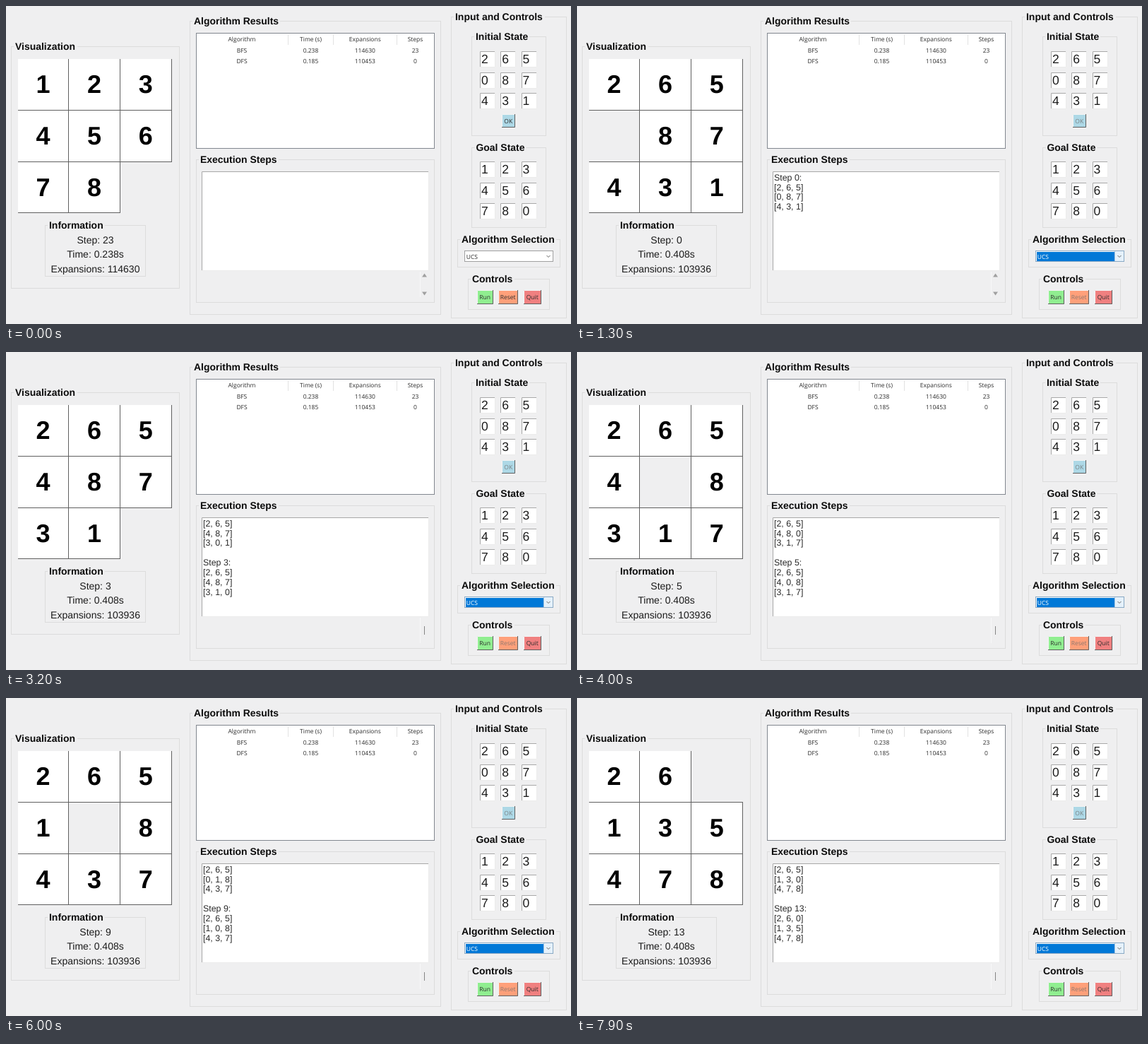
An HTML page for the animation above (8 s loop, 800 by 450 pixels).

```html
<!DOCTYPE html>
<html>
<head>
<meta charset="utf-8">
<style>
html, body { margin: 0; width: 100%; height: 100%; overflow: hidden; background: #efeff0; }
svg { display: block; width: 800px; height: 450px; }
text {
  font: 14px "Liberation Sans", Arial, sans-serif; fill: #1c1c1c;
  white-space: pre; text-rendering: geometricPrecision;
}
.title { font-size: 13.95px; font-weight: bold; fill: #0c0c0c; }
.tile { font-size: 36px; font-weight: bold; fill: #000; }
.log { font-size: 12.4px; fill: #2a2a2a; }
.entry { font-size: 17.5px; }
.ui { font: 8.5px "Open Sans", "Noto Sans", sans-serif; fill: #2c2c2c; }
.mid { text-anchor: middle; }
</style>
</head>
<body>
<svg id="stage" viewBox="0 0 800 450"></svg>
<script>
const LOOP = 8000, START = 1220, STEP = 507, SELECT_AT = 200;
const INITIAL = [2, 6, 5, 0, 8, 7, 4, 3, 1];
const GOAL = [1, 2, 3, 4, 5, 6, 7, 8, 0];
const BLANKS = [3, 6, 7, 8, 5, 4, 7, 6, 3, 4, 7, 8, 5, 2];

// Each state swaps the blank with the tile at its next position.
const states = [INITIAL];
for (let i = 1; i < BLANKS.length; i++) {
  const s = [...states[i - 1]];
  s[BLANKS[i - 1]] = s[BLANKS[i]];
  s[BLANKS[i]] = 0;
  states.push(s);
}

const text = (x, y, s, cls = '', extra = '') =>
  `<text x="${x}" y="${y}" class="${cls}" ${extra}>${s}</text>`;
const rect = (x, y, w, h, fill, stroke = 'none') =>
  `<rect x="${x}" y="${y}" width="${w}" height="${h}" fill="${fill}" stroke="${stroke}"/>`;
const path = (d, stroke, fill = 'none') => `<path d="${d}" stroke="${stroke}" fill="${fill}"/>`;

function group(x, y, r, b, title, tx, tw) {
  return rect(x + .5, y + .5, r - x - 1, b - y - 1, 'none', '#dcdcdc') +
    rect(tx - 2, y - 4, tw + 4, 9, '#efeff0') + text(tx, y + 5.4, title, 'title');
}

function bevel(x, y, w, h, fill, topLeft, bottomRight) {
  return rect(x, y, w, h, fill) +
    path(`M${x + .5} ${y + h}V${y + .5}H${x + w}`, topLeft) +
    path(`M${x + w - .5} ${y}V${y + h - .5}H${x}`, bottomRight);
}

const sunken = (x, y, w, h) => bevel(x, y, w, h, '#fff', '#a8a8a8', '#ebebeb');

function button(x, y, w, h, fill, label, off) {
  return bevel(x, y, w, h, fill, '#f4f4f4', '#606060') +
    text(x + w / 2 - .3, y + h / 2 + 3, label, 'ui mid', off ? 'style="fill:#6d6d6d;opacity:.8"' : '');
}

const entries = (state, y) => state.map((n, i) => {
  const ex = 671 + i % 3 * 29.3, ey = y + Math.floor(i / 3) * 29.5;
  return sunken(Math.round(ex), Math.round(ey), 22, 23) + text(ex + 2, ey + 17.2, n, 'entry');
}).join('');

const row = (y, cells) =>
  cells.map((c, i) => text([334, 431.5, 508.3, 579.5][i], y, c, 'ui mid')).join('');

const fixed =
  group(7, 57, 246, 400, 'Visualization', 13, 86) +
  group(55, 310, 198, 383, 'Information', 61, 77) +
  group(260, 21, 616, 437, 'Algorithm Results', 266, 120) +
  rect(269.5, 38.5, 337, 163, '#fff', '#82878f') +
  [399.5, 463.5, 553.5].map(x => path(`M${x} 40V55`, '#e2e2e2')).join('') +
  row(50.2, ['Algorithm', 'Time (s)', 'Expansions', 'Steps']) +
  row(66, ['BFS', '0.238', '114630', '23']) +
  row(80.5, ['DFS', '0.185', '110453', '0']) +
  group(269, 217, 607, 420, 'Execution Steps', 275, 109) +
  sunken(277, 234, 322, 141) +
  path('M586.5 376V412', '#f8f8f8') +
  group(630, 15, 794, 442, 'Input and Controls', 636, 125) +
  group(659, 43, 765, 184, 'Initial State', 665, 74) + entries(INITIAL, 64) +
  group(659, 200, 765, 314, 'Goal State', 665.5, 69) + entries(GOAL, 220) +
  group(639, 330, 785, 370, 'Algorithm Selection', 645, 132) +
  group(654, 386, 770, 430, 'Controls', 660, 58) +
  button(667, 402, 23, 20, '#90ee90', 'Run') +
  button(733, 402, 25, 20, '#f08080', 'Quit');

// Tile edges snap to whole pixels so that the grid lines stay crisp.
const edge = (start, i) => Math.floor(start + 72.6 * i) + .5;

function board(state) {
  const tiles = state.map((n, i) => {
    if (!n) return '';
    const c = i % 3, r = Math.floor(i / 3);
    const x = edge(16.3, c), y = edge(74.8, r);
    return rect(x, y, edge(16.3, c + 1) - x, edge(74.8, r + 1) - y, '#fff', '#606060') +
      text(52.5 + c * 72.6, 123.3 + r * 72.6, n, 'tile mid');
  }).join('');
  return `<clipPath id="area"><path d="M17 75H236V294H17Z"/></clipPath><g clip-path="url(#area)">${tiles}</g>`;
}

function log(step) {
  const lines = [];
  for (let i = 0; i <= step; i++) {
    lines.push(`Step ${i}:`);
    for (let r = 0; r < 9; r += 3) lines.push(`[${states[i].slice(r, r + 3).join(', ')}]`);
    lines.push('');
  }
  lines.push('');
  return lines.slice(-10).map((s, i) => text(279, 246.7 + i * 13.86, s, 'log')).join('');
}

function scrollbar(active) {
  return active ? path('M592.5 388V400', '#858585')
    : path('M589 383.5L592.5 378.5L596 383.5Z', 'none', '#a0a0a0') +
      path('M589 404.5L592.5 409.5L596 404.5Z', 'none', '#a0a0a0');
}

function combo(selected) {
  return rect(649.5, 346.5, 125, 15, '#fff', selected ? '#8aa9c4' : '#a0a0a0') +
    (selected ? rect(651, 348, 110, 13, '#0078d7') + rect(762, 347, 12, 14, '#e5f1fb') +
      path('M761.5 347V361', '#a9c9e2') : '') +
    text(651.7, 357.5, 'UCS', 'ui', selected ? 'style="fill:#fff"' : '') +
    path('M765.5 353L768 355.5L770.5 353', '#666');
}

function draw(step, selected) {
  const running = step >= 0;
  const info = running ? [step, '0.408', 103936] : [23, '0.238', 114630];
  return fixed + board(running ? states[step] : GOAL) +
    text(126.5, 336, `Step: ${info[0]}`, 'mid') +
    text(126.5, 356.4, `Time: ${info[1]}s`, 'mid') +
    text(126.5, 376.5, `Expansions: ${info[2]}`, 'mid') +
    (running ? log(step) : '') + scrollbar(step > 0) + combo(selected) +
    button(702, 153, 19, 19, '#add8e6', 'OK', running) +
    button(697, 402, 28, 20, '#ffa07a', 'Reset', running);
}

const stage = document.getElementById('stage');
let shown = '';
function tick() {
  const t = performance.now() % LOOP;
  const step = Math.max(-1, Math.min(BLANKS.length - 1, Math.floor((t - START) / STEP)));
  const selected = t >= SELECT_AT;
  const key = `${step} ${selected}`;
  if (key !== shown) {
    stage.innerHTML = draw(step, selected);
    shown = key;
  }
  requestAnimationFrame(tick);
}
tick();
</script>
</body>
</html>
```
